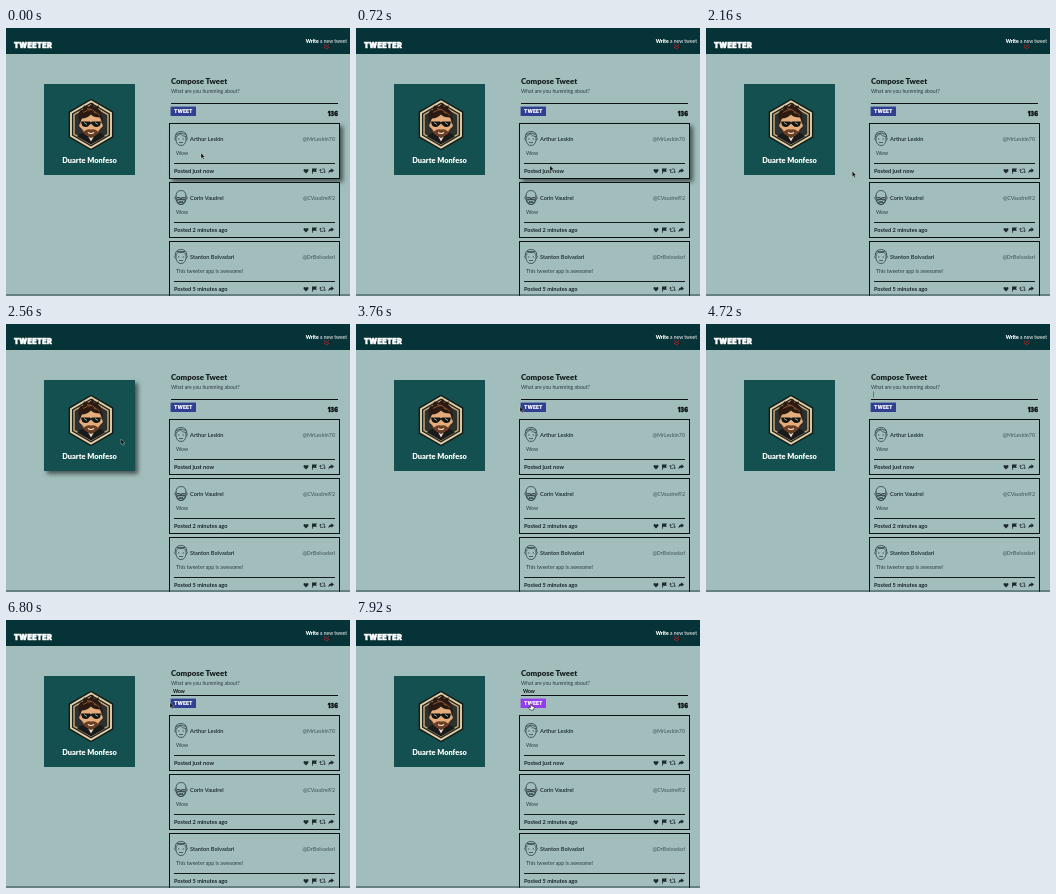
Write an HTML page that moves like this. It is 344 px wide and 268 px high and loops after 8000 ms.

```html
<!DOCTYPE html>
<html lang="en">
<head>
<meta charset="utf-8">
<title>Tweeter</title>
<style>
html, body { margin: 0; width: 100%; height: 100%; overflow: hidden; background: #a1bebd; }
svg { display: block; width: 344px; height: 268px; font-family: Lato, sans-serif; }
.block { font-family: Inter, sans-serif; font-weight: 900; }
.bold { font-weight: 700; }
.heavy { font-weight: 900; }
.line { fill: none; stroke: #26343a; stroke-width: .7; }
.lifted { filter: drop-shadow(3px 3px 2px rgba(0, 0, 0, .55)); }
</style>
</head>
<body>
<svg id="stage" viewBox="0 0 344 268">
  <rect width="344" height="268" fill="#a1bebd"/>
  <rect width="344" height="26" fill="#063337"/>
  <text class="block" x="8" y="19.8" font-size="7.2" letter-spacing=".35" fill="#fff" stroke="#fff" stroke-width=".6">TWEETER</text>
  <text x="341" y="15" font-size="5" fill="#fff" text-anchor="end"><tspan class="heavy">Write</tspan> a new tweet</text>
  <path d="M318 16.5l2.5 2 2.5-2M318 19l2.5 2 2.5-2" fill="none" stroke="#b51e25"/>

  <g id="profile">
    <rect x="38" y="56" width="91" height="91" fill="#14504f"/>
    <g id="badge" transform="translate(85 96.5)"></g>
    <text class="heavy" x="83.5" y="135" font-size="7.4" fill="#fff" text-anchor="middle">Duarte Monfeso</text>
  </g>

  <text class="heavy" x="165" y="56.3" font-size="7.8" fill="#141b1d">Compose Tweet</text>
  <text x="165" y="65.2" font-size="5.1" fill="#2d3a3c">What are you humming about?</text>
  <text id="draft" class="bold" x="167" y="72.5" font-size="5" fill="#0c1214"></text>
  <path id="caret" d="M167.5 67.5v6" stroke="#2c63bd" stroke-width=".8"/>
  <path d="M165 75.5h167" stroke="#0c1214"/>
  <rect id="button" x="164.6" y="78.6" width="25.4" height="9.4"/>
  <text class="block" x="177.3" y="85.3" font-size="5" fill="#fff" text-anchor="middle">TWEET</text>
  <text id="count" class="block" x="332" y="87.7" font-size="5.7" fill="#070c0d" stroke="#070c0d" stroke-width=".3" text-anchor="end"></text>

  <g id="cards"></g>
  <path d="M0 267h344" stroke="#2c4347"/>
  <g id="pointer">
    <path id="arrow" d="M0 0v5.4l1.3-1.1 1 2 .9-.4-.9-2h1.6z" fill="#050505" stroke="#e8eeee" stroke-width=".35"/>
    <path id="beam" d="M-1-3h2M0-3v6M-1 3h2" fill="none" stroke="#111" stroke-width=".6"/>
    <path id="hand" d="M-.6-2.5q.7-.8 1.3 0v2l2 .6q.7.3.5 1.2l-.6 2.2h-3.3l-1.9-2.4q.5-.9 2 .2z" fill="#fff" stroke="#111" stroke-width=".6"/>
  </g>
</svg>
<script>
const $ = id => document.getElementById(id);
const LOOP = 8000, STEP = 80;

const hexagon = r => Array.from({ length: 6 }, (_, i) => {
  const a = i * Math.PI / 3;
  return `${r * Math.sin(a)},${-r * Math.cos(a)}`;
}).join(' ');

const ring = (r, fill) => `<polygon points="${hexagon(r)}" fill="${fill}"/>`;

$('badge').innerHTML = ring(25.8, '#131b1a') + ring(24.2, '#e3cfa6') + ring(22, '#1c211f') +
  ring(20.4, '#cfae7c') + ring(18.8, '#2b312e') + `
  <path d="M-14 12q4-4 9-4h10q5 0 9 4l-14 8z" fill="#181a1b"/>
  <path d="M-5 8l5 9 5-9z" fill="#efe2c8"/>
  <path d="M-11-6q0-9 11-9t11 9v5q2 0 1 3-1 2-2 2-2 6-10 9-8-3-10-9-1 0-2-2-1-3 1-3z" fill="#e5ad7c" stroke="#1d1410" stroke-width=".8"/>
  <path d="M-11-2q-3-8 0-12l3-1 1-4 5 1 4-4 1 4 5-1-1 3q5 3 4 14l-2-5q-7 0-9-3-4 4-9 4z" fill="#2a1a12"/>
  <path d="M-8-12q4-3 9-3M-4-16q5 0 9 4M3-12q4 0 6 3" fill="none" stroke="#8a5730"/>
  <path d="M-10-3h9l1 1 1-1h9l-1 4q-4 3-7 0l-2-2-2 2q-3 3-7 0z" fill="#101516"/>
  <path d="M-7-2l3 2M4-2l3 2" stroke="#dfc8a6" stroke-width=".8"/>
  <path d="M-10 3l3 4q3-3 7-2 4-1 7 2l3-4q-1 7-10 10-9-3-10-10z" fill="#6b3f25"/>
  <path d="M-3 8q3 2 6 0" stroke="#fff1dc" fill="none" stroke-width="1.2"/>`;

const faces = [
  'M-5.8-1q0-6 5.8-6t5.8 6M-5-2q3-1 4-3 2 3 6 3M-5-4q5-3 10 0',
  'M-5-1q0-6 5-6t5 6M-4.2 0h3.4v2h-3.4zM.8 0h3.4v2h-3.4zM-1 1h2M-4.5 3q4.500-2 9 0-1 4-4.500 4t-4.500-4M-3 5h6',
  'M-5.8-1q0-6 5.8-6t5.8 6M-5-2q2-3 5-2 3-1 5 2M-4-5h8'
];

const face = i => `<g class="line" transform="translate(175 14.5)">
  <path d="M-5-2v4q1 5 5 5t5-5v-4M-5.200-1q-2.500 1 0 3M5.200-1q2.500 1 0 3"/>
  <path d="${faces[i]}"/><path d="M-3 .5h1.500M1.500 .5h1.500M-2 4h4"/></g>`;

const icons = `<g fill="#1e292c">
  <path d="M300 49.5l-2.400-2.500q-.5-2 1.100-2.100.9 0 1.300.9.4-.9 1.300-.9 1.600.1 1.100 2.100z"/>
  <path d="M306 44.500h5l-1 1.700 1 1.600h-4.200v2h-.8z"/>
  <path class="line" d="M313.500 46.500l1-1.500 1 1.500M314.500 45v3.500h2.500M316 45h2.500v3.500M317.500 47.500l1 1.500 1-1.500"/>
  <path d="M328 46.500l-2.600-2.200v1.300q-3 .2-2.900 4 .9-2.100 2.900-2.100v1.300z"/></g>`;

const posts = [
  ['Arthur Leskin', '@MrLeskin70', 'Wow', 'just now'],
  ['Corin Vaudrel', '@CVaudrel92', 'Wow', '2 minutes ago'],
  ['Stanton Bolvadari', '@DrBolvadari', 'This tweeter app is awesome!', '5 minutes ago']
];

$('cards').innerHTML = posts.map(([name, handle, body, age], i) => `
  <g id="card${i}" transform="translate(0 ${96 + i * 59})" font-size="5.6">
    <rect x="163.5" y="-.5" width="170" height="55" fill="#a1bebd" stroke="#0a1011"/>
    ${face(i)}
    <text class="bold" x="184" y="16.5" fill="#27363a">${name}</text>
    <text class="bold" x="329" y="16.5" font-size="5.3" fill="#566b6e" text-anchor="end">${handle}</text>
    <text x="170" y="30.9" font-size="5.2" fill="#2f3d40">${body}</text>
    <path d="M168 39.5h161" stroke="#121c1e"/>
    <text class="bold" x="168" y="49.3" fill="#172326">Posted ${age}</text>
    ${icons}
  </g>`).join('');

// Pointer stops: time, x, y
const path = [
  [0, 195, 125], [480, 195, 125], [1280, 190, 183], [1760, 190, 183],
  [2480, 115, 115], [2800, 115, 115], [3680, 164, 82.5], [3840, 164, 82.5],
  [4240, 181, 70.5], [6400, 181, 70.5], [6800, 164, 82.5], [7040, 164, 82.5],
  [7440, 175, 86.5], [8000, 175, 86.5]
];
const focusAt = 4320, keys = [4880, 5120, 5360, 6000];

function pointerAt(t) {
  const i = path.findIndex(p => p[0] > t);
  const [t0, x0, y0] = path[i - 1], [t1, x1, y1] = path[i];
  const u = (t - t0) / (t1 - t0), e = u * u * (3 - 2 * u);
  return [x0 + (x1 - x0) * e, y0 + (y1 - y0) * e];
}

const show = (id, on) => $(id).setAttribute('visibility', on ? 'visible' : 'hidden');

function draw(t) {
  const [x, y] = pointerAt(t);
  const over = (l, top, w, h) => x >= l && x < l + w && y >= top && y < top + h;
  const onButton = over(165, 79, 25, 9), onField = over(165, 66, 167, 10);
  const visible = t < focusAt || t >= 6400;

  $('pointer').setAttribute('transform', `translate(${x} ${y})`);
  show('hand', visible && onButton);
  show('beam', visible && onField);
  show('arrow', visible && !onButton && !onField);

  $('button').setAttribute('fill', onButton ? '#963cf0' : '#303f91');
  $('profile').classList.toggle('lifted', over(38, 56, 91, 91));
  posts.forEach((_, i) => $('card' + i).classList.toggle('lifted', over(163, 95 + i * 59, 171, 56)));

  const typed = keys.filter(k => k <= t);
  const lastInput = typed.length ? typed[typed.length - 1] : focusAt;
  const draft = 'Wow\n'.slice(0, typed.length).trim();
  $('draft').textContent = draft;
  $('count').textContent = typed.length ? 140 - typed.length : 136;
  const caretX = draft ? $('draft').getComputedTextLength() : 0;
  $('caret').setAttribute('transform', `translate(${caretX} 0)`);
  show('caret', t >= focusAt && (t - lastInput) % 1000 < 500);
}

const start = performance.now();
function tick() {
  const t = (performance.now() - start) % LOOP;
  draw(Math.floor(t / STEP) * STEP);
  requestAnimationFrame(tick);
}
tick();
</script>
</body>
</html>
```
